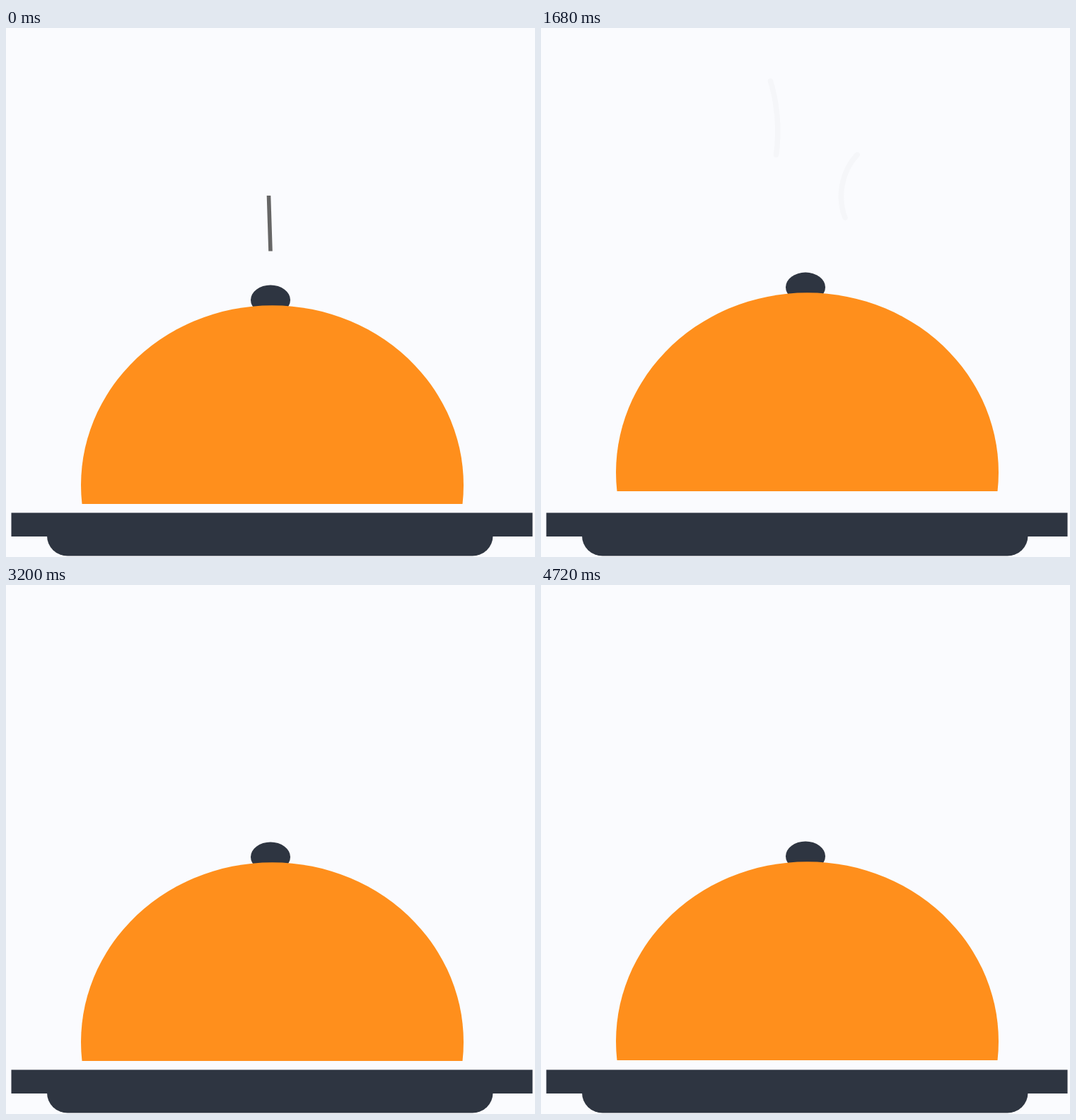
These frames come from a looping animation (748x748 px, 4.8 s). An HTML page:

```html
<!DOCTYPE html>
<html>
<head>
<meta charset="utf-8">
<style>
html, body { margin: 0; width: 100%; height: 100%; overflow: hidden; background: #fafbfe; }
svg { display: block; width: 100vw; height: 100vh; filter: blur(0.5px); }
.steam { fill: none; stroke: #666; }
</style>
</head>
<body>
<svg viewBox="0 0 748 748">
  <g class="steam" id="puff" stroke-width="5.6">
    <path d="M371.5 237L374 315.5"/>
  </g>
  <g class="steam" id="wisps" stroke-width="7.5" stroke-linecap="round">
    <path d="M324.5 80C333 107 338 146 332.5 184"/>
    <path d="M447 184C424 209 419 246 430 273"/>
  </g>
  <g id="lid">
    <ellipse cx="374" cy="384.5" rx="28" ry="21" fill="#2e3541"/>
    <path d="M107.5 673A270.5 254 0 1 1 645.5 673Z" fill="#ff8f1c"/>
  </g>
  <g fill="#2e3541">
    <path d="M7.5 685.5H744.5V719H7.5Z"/>
    <path d="M58 718H688.5A29 28.5 0 0 1 659.5 746.5H87A29 28.5 0 0 1 58 718Z"/>
  </g>
</svg>
<script>
const LOOP = 4800, STEP = 80, STEAM = 2120, RATTLE = 530;

const ramp = (t, from, to) => Math.min(1, Math.max(0, (t - from) / (to - from)));
const [lid, puff, wisps] = ["lid", "puff", "wisps"].map(id => document.getElementById(id));

function place(el, y, alpha = 1) {
  el.setAttribute("transform", `translate(0 ${y})`);
  el.setAttribute("opacity", alpha);
}

// Quick pop, slower drop, then a tiny rebound
function lidY(t) {
  const pop = 1 - (1 - ramp(t, 20, 100)) ** 3;
  const drop = ramp(t, 150, 410) ** 2;
  const rebound = Math.sin(Math.PI * ramp(t, 430, RATTLE));
  return -18 * (pop - drop) - rebound;
}

function draw(now) {
  const t = Math.floor(now % LOOP / STEP) * STEP;
  const s = t % STEAM;
  const d = (s + STEAM / 2) % STEAM - STEAM / 2;
  place(lid, lidY(t % RATTLE));
  place(puff, -0.13 * d, ramp(d, -320, -160) * (1 - ramp(d, 60, 340)));
  place(wisps,
    9 * (Math.max(0, 1740 - s) / 100) ** 1.5 - 9,
    ramp(s, 1090, 1160) * (1 - ramp(s, 1300, 1760)) ** 2);
}

let start;
function tick(now) {
  start ??= now;
  draw(now - start);
  requestAnimationFrame(tick);
}
draw(0);
requestAnimationFrame(tick);
</script>
</body>
</html>
```
